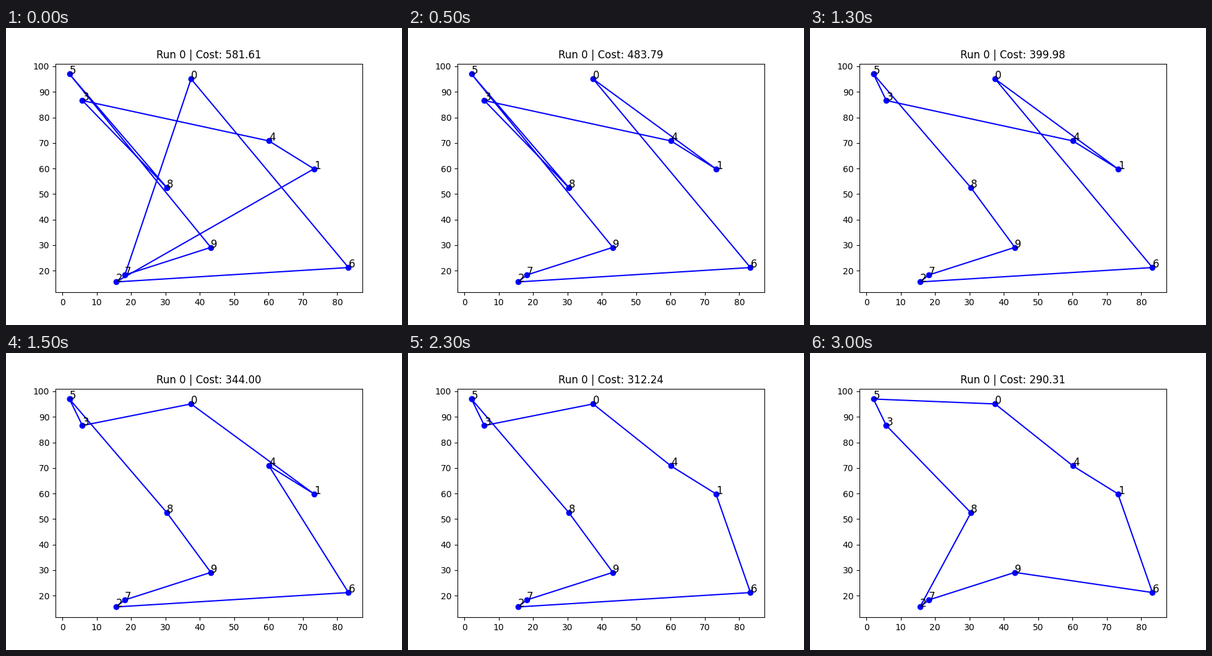
Write a matplotlib script that moves like this. It is 640 px wide and 480 px high and loops after 3.5 s.

```python
import numpy as np
import matplotlib.pyplot as plt
from matplotlib.animation import FuncAnimation

# Two-opt improvement of a round trip through ten random cities.
rng = np.random.RandomState(42)
cities = rng.rand(10, 2) * 100
first_tour = [8, 5, 9, 7, 0, 6, 2, 1, 4, 3]

# Each step reverses tour positions [start, stop), wrapping past the end.
flips = [(4, 7), (0, 2), (6, 9), (6, 8), (2, 5), (9, 11)]


def flipped(tour, start, stop):
    spots = np.arange(start, stop) % len(tour)
    result = np.array(tour)
    result[spots] = result[spots[::-1]]
    return result


def closed_path(tour):
    return cities[np.append(tour, tour[0])]


def cost(path):
    return np.hypot(*np.diff(path, axis=0).T).sum()


tours = [np.array(first_tour)]
for start, stop in flips:
    tours.append(flipped(tours[-1], start, stop))

plt.rcParams["font.family"] = "DejaVu Sans"
fig, ax = plt.subplots(figsize=(6.4, 4.8), dpi=100)
route, = ax.plot(*closed_path(tours[0]).T, "bo-")
title = ax.set_title("")
for label, (x, y) in enumerate(cities):
    ax.text(x, y, str(label), fontsize=12)


def draw(step):
    path = closed_path(tours[step])
    route.set_data(*path.T)
    title.set_text(f"Run 0 | Cost: {cost(path):.2f}")
    return route, title


anim = FuncAnimation(fig, draw, frames=len(tours), interval=500, repeat=True)
plt.show()
```
